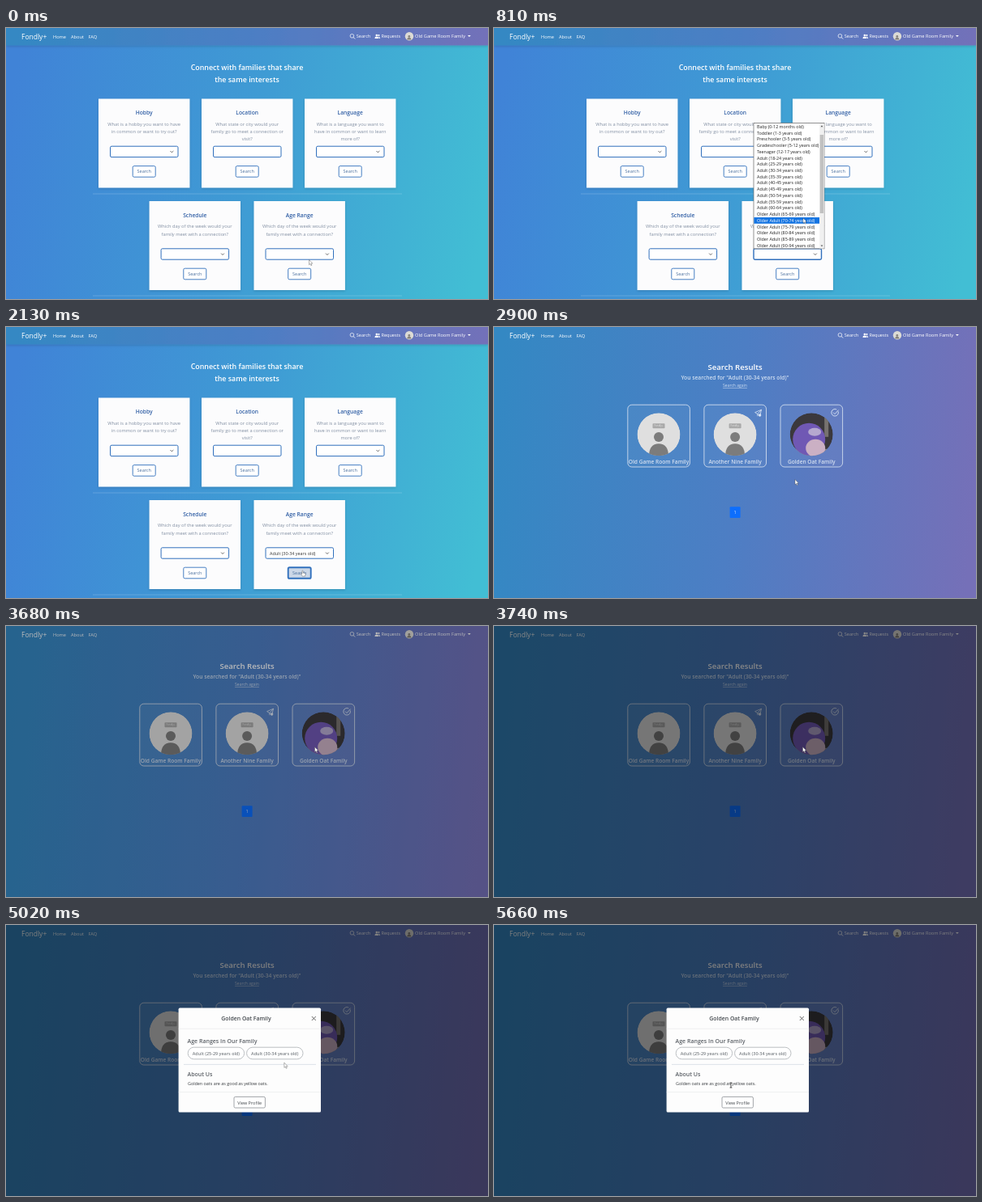
Animation of 594x335 px, one loop 5680 ms. Source, as an HTML page:

```html
<!DOCTYPE html>
<html lang="en">
<head>
<meta charset="utf-8">
<title>Family search</title>
<style>
  html, body { margin: 0; width: 100%; height: 100%; overflow: hidden; background: #3f8fd2; }
  svg { display: block; width: 594px; height: 335px; font-family: "Open Sans", "Noto Sans", sans-serif; }
</style>
</head>
<body>
<svg id="stage" viewBox="0 0 594 335" xmlns="http://www.w3.org/2000/svg"></svg>
<script>
const LOOP = 5680;
const T = { open: 470, pick: 1330, press: 2080, results: 2350, dim: 3600, modal: 3750 };
const BLUE = '#3170bd';
const BRAND = 'Fondly+', USER = 'Old Game Room Family', SECOND = 'Another Nine Family', THIRD = 'Golden Oat Family';
const stage = document.getElementById('stage');

// y is the middle of the capitals
const text = (s, x, y, size, fill, { anchor = 'middle', weight = 400, extra = '' } = {}) =>
  `<text x="${x}" y="${y + size * 0.36}" font-size="${size}" fill="${fill}" text-anchor="${anchor}" font-weight="${weight}" ${extra}>${s}</text>`;
const left = { anchor: 'start' };
const rect = (x, y, w, h, fill, extra = '') =>
  `<rect x="${x}" y="${y}" width="${w}" height="${h}" fill="${fill}" ${extra}/>`;
const line = (d, stroke, w = 0.8, extra = '') =>
  `<path d="${d}" fill="none" stroke="${stroke}" stroke-width="${w}" ${extra}/>`;

const defs = `<defs>
  <linearGradient id="sea" gradientUnits="userSpaceOnUse" x1="0" y1="110" x2="594" y2="225">
    <stop offset="0" stop-color="#4083d7"/><stop offset=".5" stop-color="#3f9bd4"/><stop offset="1" stop-color="#42bed4"/>
  </linearGradient>
  <linearGradient id="dusk" gradientUnits="userSpaceOnUse" x1="0" y1="140" x2="594" y2="195">
    <stop offset="0" stop-color="#3488c3"/><stop offset=".5" stop-color="#4d7ec4"/><stop offset="1" stop-color="#7570b8"/>
  </linearGradient>
  <filter id="soft" x="-20%" y="-20%" width="140%" height="150%">
    <feDropShadow dx="0" dy="1.2" stdDeviation="1.8" flood-opacity=".15"/>
  </filter>
  <clipPath id="round"><circle r="26.5"/></clipPath>
  <clipPath id="listClip"><rect x="320" y="117.5" width="87" height="155"/></clipPath>
</defs>`;

function navBar() {
  const links = [['Home', 58], ['About', 80], ['FAQ', 101.5]];
  return text(BRAND, 19, 11, 8.5, '#fff', left) +
    links.map(([s, x]) => text(s, x, 11, 5.65, '#fff', left)).join('') +
    `<circle cx="426.4" cy="9.8" r="2.3" fill="none" stroke="#fff" stroke-width=".7"/>` +
    line('M428.1 11.5l2 2', '#fff', 0.9) +
    text('Search', 431.7, 10, 5.6, '#fff', left) +
    `<g fill="#fff"><circle cx="456.8" cy="9" r="1.3"/><path d="M454.4 13q0-2.4 2.4-2.4t2.4 2.4z"/>
     <circle cx="459.4" cy="9" r="1.1"/><path d="M459.7 13q0-2-1-2.5 2.4-.2 2.4 2.5z"/></g>` +
    text('Requests', 462.5, 10, 5.55, '#fff', left) +
    `<circle cx="497" cy="10.3" r="5.2" fill="#dcdbd5"/><circle cx="496.8" cy="10.4" r="1.4" fill="#85827c"/>
     <path d="M494.2 14.6q0-2.9 2.6-2.9t2.6 2.9z" fill="#85827c"/>` +
    text(USER, 504, 10, 5.67, '#fff', left) +
    '<path d="M569 9h3.8l-1.9 2z" fill="#fff"/>';
}

function searchCard(x, y, title, lines, fieldY, isSelect, last) {
  const mid = x + 56.2, fx = x + 14.5, by = fieldY + 24.4;
  const id = name => last ? `id="${name}"` : '';
  return rect(x, y, 112.4, 110, '#fcfcfd', 'filter="url(#soft)"') +
    text(title, mid, y + 17.5, 6.7, '#315fa5', { weight: 600 }) +
    lines.map((s, i) => text(s, mid, y + 31.4 + i * 9.2, 5.72, '#8390a3')).join('') +
    rect(fx, fieldY, 83.5, 13.4, '#fff', `rx="1.6" stroke="${BLUE}" stroke-width="1" ${id('field')}`) +
    (isSelect ? line(`M${fx + 74} ${fieldY + 5.8}l1.9 1.9 1.9-1.9`, '#444', 0.8) : '') +
    rect(mid - 14, by, 28, 13.6, '#fff', `rx="1.6" stroke="${BLUE}" stroke-width=".9" ${id('button')}`) +
    text('Search', mid, by + 6.9, 5.5, '#4a6f9e');
}

function searchPage() {
  const day = ['Which day of the week would your', 'family meet with a connection?'];
  return rect(0, 0, 594, 335, 'url(#sea)') +
    rect(0, 0, 594, 21.5, 'url(#dusk)', 'filter="url(#soft)"') +
    text('Connect with families that share', 297, 49, 8.9, '#fff', { weight: 600 }) +
    text('the same interests', 297, 63.5, 8.9, '#fff', { weight: 600 }) +
    searchCard(114, 87.5, 'Hobby', ['What is a hobby you want to have', 'in common or want to try out?'], 146.2, true) +
    searchCard(241, 87.5, 'Location', ['What state or city would your', 'family go to meet a connection or', 'visit?'], 146.2, false) +
    searchCard(368, 87.5, 'Language', ['What is a language you want to', 'have in common or want to learn', 'more of?'], 146.2, true) +
    searchCard(176.6, 214, 'Schedule', day, 272.8, true) +
    searchCard(305.5, 214, 'Age Range', day, 272.8, true, true) +
    line('M107 205H488M107 331H488', '#fff', 0.6, 'opacity=".3"') +
    text('Adult (30-34 years old)', 325, 279.6, 5.42, '#333', { anchor: 'start', extra: 'id="choice"' });
}

function ageList() {
  const years = (who, spans) => spans.split(' ').map(s => `${who} (${s} years old)`);
  const ages = ['Baby (0-12 months old)',
    ...years('Toddler', '1-3'), ...years('Preschooler', '3-5'),
    ...years('Gradeschooler', '5-12'), ...years('Teenager', '12-17'),
    ...years('Adult', '18-24 25-29 30-34 35-39 40-45 45-49 50-54 55-59 60-64'),
    ...years('Older Adult', '65-69 70-74 75-79 80-84 85-89 90-94')];
  return rect(320, 117.5, 87, 155.3, '#fff', 'stroke="#666" stroke-width=".7"') +
    rect(320.4, 0, 80.8, 7.73, '#1474e2', 'id="mark"') +
    `<g clip-path="url(#listClip)">` +
    ages.map((s, i) => text(s, 324, rowY(i), 5.36, '#222', { anchor: 'start', extra: 'class="age"' })).join('') + '</g>' +
    rect(401.2, 118, 5.5, 154.5, '#f0f0f0') +
    rect(401.7, 132, 4.5, 97, '#c1c1c1') +
    '<path d="M402.6 122.2h2.8l-1.4-1.9zM402.6 268.4h2.8l-1.4 1.9z" fill="#555"/>';
}
const rowY = i => 122 + i * 7.73;

function familyCard(x, name, face, badge) {
  return rect(x, 96.2, 76.6, 76.8, '#fff', 'rx="5" fill-opacity=".04" filter="url(#soft)"') +
    rect(x, 96.2, 76.6, 76.8, 'none', 'rx="5" stroke="#d0dcee" stroke-width=".9"') +
    `<g transform="translate(${x + 38.2} 132.8)"><g clip-path="url(#round)">${face}</g></g>` +
    text(name, x + 38.2, 167, 6.6, '#d5e0f1', { weight: 600 }) + badge;
}

function resultsPage() {
  const blank = '<circle r="26.5" fill="#dfdfdf"/>' + rect(-7.5, -13.6, 15, 6, '#a9a9a9', 'rx=".8"') +
    text(BRAND, 0, -10.6, 3, '#e8e8e8') +
    '<circle cy="3.2" r="6" fill="#7c7c7c"/><path d="M-12 27q0-15.5 12-15.5t12 15.5z" fill="#7c7c7c"/>';
  const plush = '<circle r="26.5" fill="#3b383c"/>' + rect(16, -27, 5, 30, '#77726f') + rect(-27, 18, 54, 10, '#98929a') +
    '<ellipse cx="-3" cy="6" rx="20" ry="20" fill="#7058b4"/><ellipse cx="5" cy="17" rx="12" ry="11" fill="#cbb0c4"/>' +
    '<ellipse cx="4" cy="-3" rx="8" ry="5" fill="#b5a8cf"/>';
  const plane = line('M321.6 105.6l8-3.4-2 7.8-2.8-2.4zM324.8 107.6l4.8-5.4M324.8 107.6v2.6', '#dbe6f5', 0.8) +
    '<circle cx="327.6" cy="109" r="1.7" fill="#dbe6f5"/>';
  const check = line('M424.2 104.4a4.3 4.3 0 1 1-2-2.4M418 105.6l2 2 4.6-5', '#dbe6f5', 0.9);
  return rect(0, 0, 594, 335, 'url(#dusk)') +
    text('Search Results', 297, 49.5, 9.6, '#fff', { weight: 600 }) +
    text('You searched for "Adult (30-34 years old)"', 297, 62.8, 6.7, '#cfdef1', { weight: 600 }) +
    text('Search again', 297, 72.4, 5.04, '#cfdef1', { extra: 'text-decoration="underline"' }) +
    familyCard(164.8, USER, blank, '') +
    familyCard(258.9, SECOND, blank, plane) +
    familyCard(353, THIRD, plush, check) +
    rect(290.6, 222.2, 13, 13.8, '#0d6efd', 'rx="1"') +
    text('1', 297.1, 229.2, 4.6, '#fff');
}

function dialog() {
  const pill = (x, s) => rect(x, 151.2, 69.4, 14.6, '#fff', 'rx="7.3" stroke="#b4b8bb" stroke-width=".9"') +
    text(s, x + 34.7, 158.7, 5.45, '#7b8085', { weight: 600 });
  const head = { anchor: 'start', weight: 600 };
  return rect(212.6, 102.6, 175.4, 129, '#fdfdfd', 'rx="1.6"') +
    text(THIRD, 296, 116, 6.9, '#43484d', { weight: 600 }) +
    line('M376.8 113l5 5m0-5l-5 5', '#555', 0.9) +
    line('M212.6 128.2H388M212.6 206.6H388', '#e4e6e8', 0.6) +
    text('Age Ranges In Our Family', 223.6, 143.6, 7, '#5b6066', head) +
    pill(224.2, 'Adult (25-29 years old)') + pill(296.6, 'Adult (30-34 years old)') +
    line('M219 172.4H382', '#c6cedb', 0.6) +
    text('About Us', 223.6, 184.2, 7, '#5b6066', head) +
    text('Golden oats are as good as yellow oats.', 224, 196, 5.4, '#33373b', left) +
    rect(281, 212.4, 38.4, 13.6, '#fff', 'rx="1.6" stroke="#8b9095" stroke-width=".8"') +
    text('View Profile', 300.2, 219.6, 5.5, '#43484d');
}

const outline = 'fill="#fff" stroke="#444" stroke-width=".4"';
const pointers = {
  arrow: `<path d="M0 0v6.2l1.4-1.2 1 2.2 1-.5-1-2.1h1.9z" ${outline}/>`,
  hand: `<path d="M-.6 0q.6-.7 1.2 0v2.4l2.4.6q.6.2.5 1l-.5 2.6h-3.2l-2-2.8q.2-.8 1.6.1z" ${outline}/>`,
  beam: line('M-1.4-3h2.8M0-3v6M-1.4 3h2.8', '#111', 0.7)
};

const group = (id, body) => `<g id="${id}">${body}</g>`;
stage.innerHTML = defs + group('search', searchPage()) + group('results', resultsPage()) + navBar() +
  group('list', ageList()) + rect(0, 0, 594, 335, '#000', 'id="shade"') + group('modal', dialog()) +
  group('pointer', Object.keys(pointers).map(k => group(k, pointers[k])).join(''));

const el = {};
stage.querySelectorAll('[id]').forEach(n => el[n.id] = n);
const ages = [...stage.querySelectorAll('.age')];
const show = (node, on) => node.setAttribute('visibility', on ? 'visible' : 'hidden');
const set = (node, attrs) => { for (const k in attrs) node.setAttribute(k, attrs[k]); };
const span = (t, from, length) => Math.min(1, Math.max(0, (t - from) / length));

// time, x, y of the pointer's tip
const path = [
  [0, 373.5, 286.5], [20, 373.5, 286.5], [140, 381, 281], [460, 381, 281], [810, 381, 235],
  [1100, 375, 177], [1360, 375, 177], [1960, 365.5, 301.5], [2320, 365.5, 301.5],
  [2860, 371, 188.5], [2960, 371, 188.5], [3400, 380.5, 149.5], [4580, 380.5, 149.5],
  [5560, 292, 198], [LOOP, 292, 198]
];

function pointerAt(t) {
  const i = path.findIndex(p => p[0] > t);
  const [t0, x0, y0] = path[i - 1], [t1, x1, y1] = path[i];
  const u = (t - t0) / (t1 - t0), e = u * u * (3 - 2 * u);
  return [x0 + (x1 - x0) * e, y0 + (y1 - y0) * e];
}

function draw(t) {
  const [x, y] = pointerAt(t);
  const onResults = t >= T.results, listOpen = t >= T.open && t < T.pick;
  const inside = (l, top, r, b) => x > l && x < r && y > top && y < b;
  const overButton = !onResults && t > T.pick && inside(347, 297, 376, 311);
  const overCard = onResults && t < T.dim && inside(353, 96, 430, 173);
  const overText = t > T.modal && inside(223, 191, 326, 202);

  show(el.search, !onResults);
  show(el.results, onResults);
  show(el.list, listOpen);
  show(el.choice, !onResults && t >= T.pick);

  const row = Math.max(0, Math.min(19, Math.floor((y - 118.1) / 7.73)));
  el.mark.setAttribute('y', rowY(row) - 3.87);
  ages.forEach((n, i) => n.setAttribute('fill', i === row ? '#fff' : '#222'));

  const pressed = !onResults && t >= T.press;
  const focused = t >= T.open && t < T.press;
  set(el.field, { 'stroke-width': focused ? 1.4 : 1 });
  set(el.button, {
    fill: pressed ? '#cbd7e7' : overButton ? '#dbe5f1' : '#fff',
    'stroke-width': pressed ? 1.9 : 0.9
  });

  el.shade.setAttribute('opacity', 0.5 * span(t, T.dim, 150));
  const slide = 1 - (1 - span(t, T.modal, 200)) ** 3;
  set(el.modal, { opacity: span(t, T.modal, 140), transform: `translate(0 ${-19 * (1 - slide)})` });

  el.pointer.setAttribute('transform', `translate(${x} ${y})`);
  const kind = overText ? 'beam' : overButton || overCard ? 'hand' : 'arrow';
  Object.keys(pointers).forEach(k => show(el[k], k === kind));
}

const start = performance.now();
function tick() {
  draw((performance.now() - start) % LOOP);
  requestAnimationFrame(tick);
}
tick();
</script>
</body>
</html>
```
